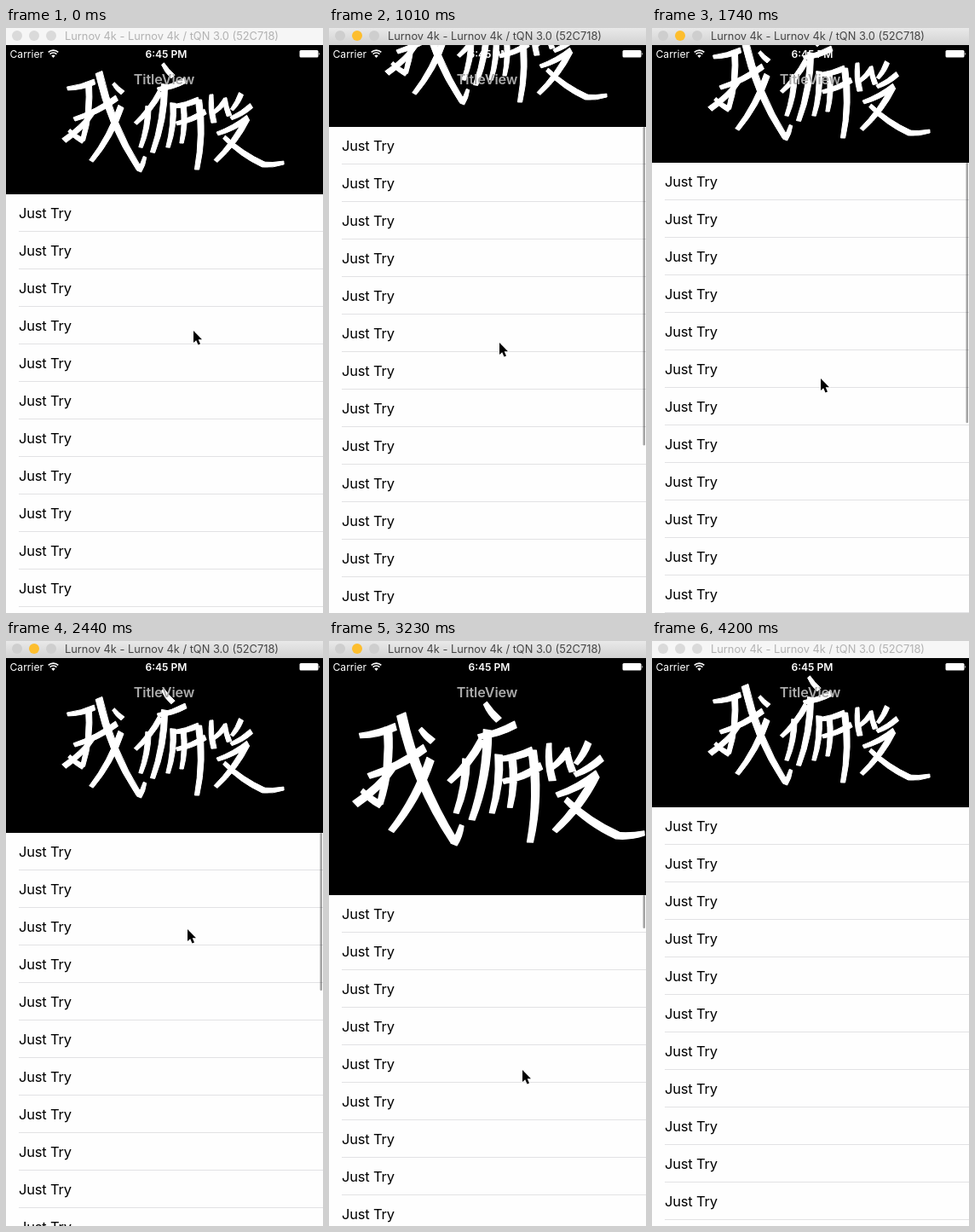
An HTML page that plays this animation: 372x686 px, repeating every 4230 ms.

```html
<!DOCTYPE html>
<html lang="en">
<head>
<meta charset="utf-8">
<title>Stretchy header</title>
<style>
  html, body { margin: 0; width: 100%; height: 100%; overflow: hidden; background: #fff; }
  svg { display: block; width: 100vw; height: 100vh; }
  text { font-family: Inter, Roboto, sans-serif; }
</style>
</head>
<body>
<svg viewBox="0 0 372 686">
  <defs>
    <linearGradient id="chrome" x2="0" y2="1">
      <stop offset="0" stop-color="#e9e9e9"/>
      <stop offset="1" stop-color="#d2d2d2"/>
    </linearGradient>
  </defs>

  <rect y="20" width="372" height="300" fill="#000"/>
  <g id="brush" fill="#fff" stroke="#fff" stroke-linejoin="round"/>

  <g id="list"><rect width="372" height="686" fill="#fefefe"/></g>
  <rect id="bar" x="368.5" width="2.5" rx="1.2" fill="#000" fill-opacity=".36"/>

  <text x="185.5" y="66" font-size="16.2" font-weight="600" letter-spacing="-.1" text-anchor="middle" fill="#aaa">TitleView</text>
  <g fill="#fff">
    <text x="4.5" y="34.5" font-size="12.1">Carrier</text>
    <text x="188" y="34.5" font-size="12.1" font-weight="600" text-anchor="middle">6:45 PM</text>
    <g fill="none" stroke="#fff" stroke-width="1.6">
      <path d="M51.6 30.6a5.6 5.6 0 0 1 7.8 0"/>
      <path d="M49.7 28.4a8.4 8.4 0 0 1 11.6 0"/>
    </g>
    <path d="M55.5 35l-2.2-2.4a3.2 3.2 0 0 1 4.4 0z"/>
    <rect x="344.5" y="26" width="22" height="8.5" rx="1.5"/>
    <path d="M367.4 28.5q1.8 1.7 0 3.5z"/>
  </g>

  <rect id="chromeBar" width="372" height="20"/>
  <g id="lights"><circle cx="13" cy="9" r="6"/><circle cx="33" cy="9" r="6"/><circle cx="53" cy="9" r="6"/></g>
  <text id="caption" x="194.5" y="14" font-size="12.8" text-anchor="middle">Lurnov 4k - Lurnov 4k / tQN 3.0 (52C718)</text>

  <path id="cursor" d="M0 0V14L3.2 11.2 5.5 16.5 8 15.4 5.7 10.3H10Z" fill="#000" stroke="#fff" stroke-width="1.4" stroke-linejoin="round" paint-order="stroke"/>
</svg>
<script>
const LOOP = 4230, REST = 195, TOP = 20;
const DRAG1_END = 1800, DRAG2 = 2200, RELEASE = 3200;
const NS = 'http://www.w3.org/2000/svg';
const $ = id => document.getElementById(id);

function add(parent, tag, attrs, label) {
  const el = document.createElementNS(NS, tag);
  for (const k in attrs) el.setAttribute(k, attrs[k]);
  if (label) el.textContent = label;
  parent.append(el);
}

// Brush stroke from a thick start to a thin end, sagging slightly
function stroke(x0, y0, x1, y1) {
  const dx = x1 - x0, dy = y1 - y0, len = Math.hypot(dx, dy);
  const nx = -dy / len, ny = dx / len;
  const sag = len * 0.09 * Math.sign(dx), thick = 2.6 + len / 80, thin = 1.6 + len / 80;
  const rim = (x, y, w) => `${x + nx * w} ${y + ny * w}`;
  const mx = (x0 + x1) / 2 + nx * sag, my = (y0 + y1) / 2 + ny * sag;
  return `M${rim(x0, y0, thick)}Q${rim(mx, my, thick)} ${rim(x1, y1, thin)}` +
    `L${rim(x1, y1, -thin)}Q${rim(mx, my, -thick)} ${rim(x0, y0, -thick)}Z`;
}

// Each glyph is a few strokes: start and end points
function glyph(...strokes) {
  add($('brush'), 'path', { d: strokes.map(s => stroke(...s)).join('') });
}

glyph([104, 63, 72, 71], [97, 64, 90, 132], [91, 133, 74, 120], [130, 82, 80, 107],
  [68, 132, 104, 97], [109, 52, 156, 165], [156, 168, 163, 151], [135, 92, 100, 156], [137, 76, 126, 65]);
glyph([181, 75, 152, 112], [167, 92, 158, 140], [196, 57, 184, 42], [211, 61, 178, 72],
  [186, 66, 172, 146], [196, 88, 190, 140], [226, 84, 196, 92], [226, 84, 224, 166],
  [234, 98, 200, 112], [208, 90, 206, 135]);
glyph([244, 111, 241, 78], [258, 84, 243, 100], [262, 103, 257, 82], [276, 77, 265, 96],
  [288, 91, 264, 106], [284, 105, 248, 124], [283, 106, 246, 156], [302, 160, 256, 128], [300, 160, 326, 158]);

for (let i = 0; i < 14; i++) {
  add($('list'), 'text', { x: 15, y: i * 44 + 28, 'font-size': 16.5, 'letter-spacing': -0.2 }, 'Just Try');
  add($('list'), 'rect', { x: 15, y: i * 44 + 43, width: 357, height: 1, fill: '#e2e2e4' });
}

// The screen refreshes in beats: start, refreshes until the next start
const beats = [[0, 1], [50, 7], [550, 1], [610, 5], [1010, 2], [1190, 1], [1390, 4], [1740, 2],
  [1920, 8], [2440, 1], [2530, 4], [2880, 3], [3140, 5], [3610, 1], [3690, 6], [4200, 1]];

function snap(t) {
  const i = beats.findLastIndex(b => b[0] <= t);
  const [start, n] = beats[i];
  const gap = ((beats[i + 1] || [LOOP])[0] - start) / n;
  return start + Math.floor((t - start) / gap + 1e-6) * gap;
}

// Pointer: time, x, y
const path = [[0, 220, 355], [550, 208, 458], [610, 206, 454], [1010, 200, 369], [1130, 199, 360],
  [1310, 199, 360], [1740, 198, 411], [1900, 199, 417], [2220, 210, 274], [2440, 213, 338],
  [2880, 222, 452.5], [3200, 228, 515], [3610, 292, 631], [3860, 318, 700], [LOOP, 318, 700]];

function pointer(t) {
  const i = path.findIndex(p => p[0] > t);
  const a = path[i - 1], b = path[i], k = (t - a[0]) / (b[0] - a[0]);
  return [1, 2].map(j => a[j] + (b[j] - a[j]) * k);
}

const clamp = v => Math.max(0, Math.min(1, v));
const drag = y => Math.min(REST, y - 253.5);
const rubber = pull => 666 * (1 - 1 / (1 + Math.max(0, pull) * 0.55 / 666));

// Lower edge of the header
function edge(t) {
  const y = pointer(t)[1];
  if (t < 600) return REST;
  if (t < DRAG1_END) return drag(y);
  if (t < DRAG2) {
    const from = drag(pointer(DRAG1_END)[1]);
    const k = clamp((t - DRAG1_END) / 220);
    return from + (REST - from) * k * (2 - k);
  }
  if (t < RELEASE) return REST + rubber(y - 281.5);
  const s = (t - RELEASE) * 0.0108;
  return REST + rubber(pointer(RELEASE)[1] - 281.5) * (1 + s) * Math.exp(-s);
}

function draw(now) {
  const t = snap(now % LOOP);
  const h = Math.round(edge(t));
  const mid = h < REST ? h - 87.5 : (TOP + h) / 2;
  const zoom = Math.max(1, (h - TOP) / 211.5);
  $('brush').setAttribute('transform', `translate(186 ${mid}) scale(${zoom}) translate(-186 -107.5)`);
  $('list').setAttribute('transform', `translate(0 ${h})`);

  const end = h > REST ? 635 - h : 440 + (REST - h) * 0.625;
  $('bar').setAttribute('y', h);
  $('bar').setAttribute('height', end - h);
  $('bar').setAttribute('opacity', clamp((t - 590) / 100) * clamp((4100 - t) / 250));

  const active = t >= 470 && t < 4100;
  $('chromeBar').setAttribute('fill', active ? 'url(#chrome)' : '#f6f6f6');
  $('caption').setAttribute('fill', active ? '#444' : '#b2b2b2');
  $('lights').setAttribute('fill', active ? '#cecece' : '#dadada');
  $('lights').children[1].setAttribute('fill', active ? '#fdbe2e' : '#dadada');

  const [x, y] = pointer(t).map(Math.round);
  $('cursor').setAttribute('transform', `translate(${x} ${y})`);
}

const begin = performance.now();
function tick() {
  draw(performance.now() - begin);
  requestAnimationFrame(tick);
}
tick();
</script>
</body>
</html>
```
